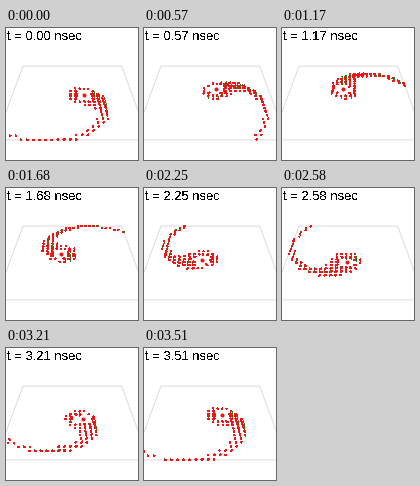
These frames come from a looping animation (132x132 px, 3540 ms). A matplotlib script:

```python
import numpy as np
import matplotlib.pyplot as plt
from matplotlib.animation import FuncAnimation
from matplotlib.collections import LineCollection

SIZE, DPI = 132, 100
FRAMES, STEP_MS = 118, 30
BETA = 0.6            # orbital speed / c, orbit radius = 1
HALF = 5.0            # half side of the square plane
FLOOR, CEIL, VOID = 0.34, 0.8, 0.78
ARROW = 0.3           # arrow length per unit of field
RED, GREEN, GREY = "#f01414", "#108a20", "#dcdcdc"


def project(x, y, z=0.0):
    """Perspective view of the plane, in pixels from the top left."""
    s = 1 / (1 + 0.0434 * y)
    return 66.3 + 12 * s * x, -95 + 162 * s - 9.8 * s * z


def dot(a, b):
    return (a * b).sum(axis=-1)


def orbit(angle):
    return np.stack([np.cos(angle), np.sin(angle)], axis=-1)


# rows run from the far edge to the near one, so nearer arrows cover farther
ticks = np.linspace(-HALF, HALF, 26)
grid = np.stack(np.meshgrid(ticks, ticks[::-1]), axis=-1).reshape(-1, 2)


def fields(theta):
    """Lienard-Wiechert field of a circling negative charge on the grid."""
    lag = np.zeros(len(grid))
    for _ in range(45):
        lag = BETA * np.linalg.norm(grid - orbit(theta - lag), axis=1)
    pos = orbit(theta - lag)
    sep = grid - pos
    dist = np.maximum(np.linalg.norm(sep, axis=1), 1e-6)[:, None]
    n = sep / dist
    vel = BETA * np.stack([-pos[:, 1], pos[:, 0]], axis=-1)
    acc = -BETA**2 * pos
    kappa = 1 - dot(n, vel)[:, None]
    near = (n - vel) * (1 - BETA**2) / dist**2
    far = (dot(n, acc)[:, None] * (n - vel) - kappa * acc) / dist
    e = -(near + far) / kappa**3
    b = n[:, 0] * e[:, 1] - n[:, 1] * e[:, 0]
    return e, b


def segments(start, end):
    return np.stack([np.stack(start, axis=-1), np.stack(end, axis=-1)], axis=1)


fig = plt.figure(figsize=(SIZE / DPI, SIZE / DPI), dpi=DPI, facecolor="white")
ax = fig.add_axes([0, 0, 1, 1])
ax.set_xlim(0, SIZE)
ax.set_ylim(SIZE, 0)
ax.axis("off")

corners = np.array([[-1, -1], [1, -1], [1, 1], [-1, 1], [-1, -1]]) * HALF
ax.plot(*project(*corners.T), color=GREY, lw=0.72, zorder=1)
arrows = LineCollection([], linewidths=0.72, antialiaseds=False, zorder=2,
                        capstyle="butt")
ax.add_collection(arrows, autolim=False)
charge, = ax.plot([], [], "o", color=RED, ms=2.9, mew=0, zorder=3)
label = ax.text(1, 11.5, "", family="Liberation Sans", size=13 * 72 / DPI,
                color="black", va="baseline", antialiased=False)


def draw(i):
    theta = 2 * np.pi * i / FRAMES
    here = orbit(theta)
    e, b = fields(theta)
    size = np.linalg.norm(e, axis=1)
    clear = np.linalg.norm(grid - here, axis=1) > VOID

    base = project(*grid.T)
    tip = grid + ARROW * e * np.minimum(1, CEIL / size)[:, None]
    top = ARROW * np.clip(b, -CEIL, CEIL)
    e_segs = segments(base, project(*tip.T))
    b_segs = segments(base, project(*grid.T, top))

    # alternate B and E so that depth order holds for both
    segs = np.stack([b_segs, e_segs], axis=1).reshape(-1, 2, 2)
    strength = np.stack([np.abs(b), size], axis=1).ravel()
    keep = np.repeat(clear, 2) & (strength > FLOOR)
    arrows.set_segments(segs[keep])
    arrows.set_color(np.tile([GREEN, RED], len(grid))[keep])

    x, y = project(*here)
    charge.set_data([x], [y])
    label.set_text(f"t = {i * STEP_MS / 1000:.2f} nsec")
    return arrows, charge, label


anim = FuncAnimation(fig, draw, frames=FRAMES, interval=STEP_MS,
                     repeat=True, repeat_delay=0, blit=False)
plt.show()
```
